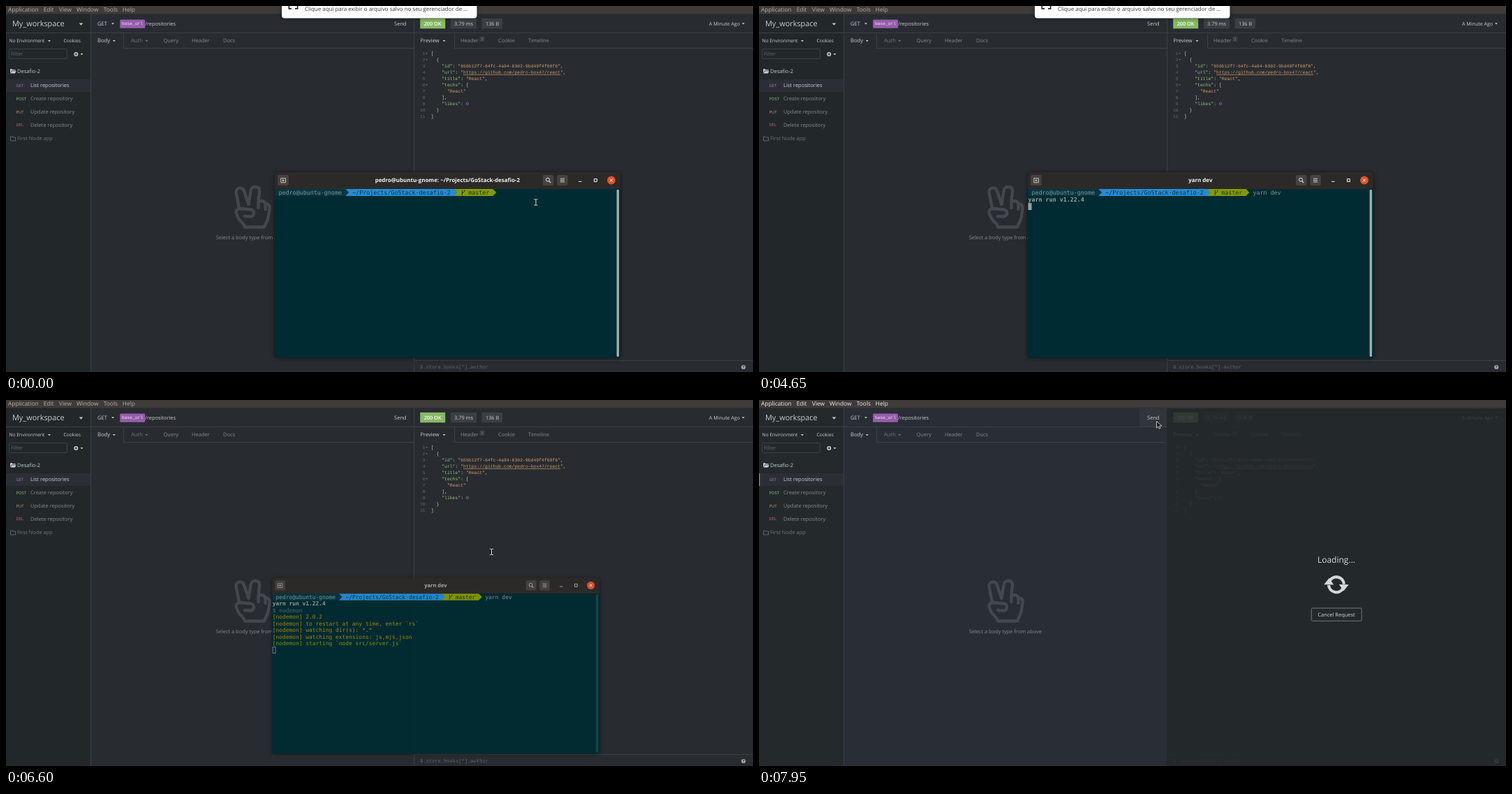
An HTML page for the animation above (8 s loop, 1070 by 524 pixels).

```html
<!DOCTYPE html>
<html lang="en">
<head>
<meta charset="utf-8">
<title>API client and terminal</title>
<style>
  html, body { margin: 0; width: 100%; height: 100%; overflow: hidden; background: #282c31; }
  svg { display: block; width: 1070px; height: 524px; }
  text { font-family: "Open Sans", "Noto Sans", sans-serif; white-space: pre; text-rendering: geometricPrecision; }
  .code { font-family: "Liberation Mono", monospace; }
  .term { font-family: "DejaVu Sans Mono", monospace; }
</style>
</head>
<body>
<svg id="stage" viewBox="0 0 1070 524" xmlns="http://www.w3.org/2000/svg"></svg>
<script>
const LOOP = 8000, STEP = 50;
const CELL = 5.03, ROW = 10.05, TERM_X = 385.5, TERM_Y = 262;
const C = {
  line: '#3b4046', text: '#c9ccd0', mid: '#9a9ea3', dim: '#70757a',
  green: '#98c379', orange: '#d19a66', red: '#d8606a', purple: '#b56fd0',
  base: '#839496', base1: '#93a1a1', dark: '#073642', blue: '#268bd2', olive: '#859900', yellow: '#a98a08'
};

const esc = s => s.replace(/&/g, '&amp;').replace(/</g, '&lt;');
const text = (x, y, size, fill, s, more = '') =>
  `<text x="${x}" y="${y}" font-size="${size}" fill="${fill}" ${more}>${esc(s)}</text>`;
const rect = (x, y, w, h, fill, more = '') =>
  `<rect x="${x}" y="${y}" width="${w}" height="${h}" fill="${fill}" ${more}/>`;
const path = (d, stroke, w = 1, more = '') =>
  `<path d="${d}" fill="none" stroke="${stroke}" stroke-width="${w}" ${more}/>`;
const shape = (d, fill) => `<path d="${d}" fill="${fill}"/>`;
const caret = (x, y, fill, r = 2) => shape(`M${x - r} ${y - r / 2}h${2 * r}l${-r} ${r * 1.1}z`, fill);
const group = (id, inner, more = '') => `<g id="${id}" ${more}>${inner}</g>`;

function sidebar() {
  const items = [['GET', 'List repositories', C.purple], ['POST', 'Create repository', C.green],
    ['PUT', 'Update repository', C.orange], ['DEL', 'Delete repository', C.red]];
  return rect(0, 11, 121, 513, '#22272a', 'id="side"') +
    text(9, 29, 10.9, C.text, 'My_workspace') + caret(107.5, 26, C.text, 2.8) +
    text(4.5, 52.3, 6.7, C.text, 'No Environment') + caret(62, 50, C.text) +
    text(82.5, 52.3, 6.7, C.text, 'Cookies') +
    rect(4.5, 61.5, 83, 14, 'none', `rx="1.5" stroke="${C.line}"`) + text(7, 71.3, 7.4, '#62676c', 'Filter') +
    `<circle cx="100.3" cy="69" r="3" fill="${C.text}"/>` + path('M98.5 69h3.6M100.3 67.2v3.6', '#22272a', .9) +
    caret(108.5, 69, C.text) +
    shape('M6 96.5V90.3h2.8l.9 1h4v1.2H8zM6.6 96.6l1.8-3.4h6.2l-1.7 3.4z', C.text) +
    text(16, 96.1, 7.5, C.text, 'Desafio-2') +
    rect(0, 105, 121, 18, '#2b2f35') + rect(0, 105, 1.2, 18, C.purple, 'id="mark"') +
    items.map(([verb, name, col], i) => {
      const y = 116.4 + i * 18.7;
      return text(14.6, y - .2, 5.8, col, verb) + text(35, y, 7.5, i ? '#85898e' : C.text, name);
    }).join('') +
    path('M6.5 187h2.5l1 1h3.5v5h-7z', C.dim, .8) + text(16, 192.3, 7.45, C.dim, 'First Node app');
}

function request() {
  const hand = 'M334 290L329.8 268C328 260 338.5 257 341 265L347.5 284L350.5 265C351 256.5 363.5 257 363 265L361.5 281' +
    'C365 277.5 371 279 371.5 284C374.5 282.5 378 285 377.7 289.5L376 301C374.5 309 371 312 370 316.5H342' +
    'C341 310 335 309 332.5 303L329.7 296.5C329 292 332 290 336 290L351 291.5C357 293.5 356 301.5 350 301.5L342 301' +
    'M361.5 281V289M371.5 284V291';
  return rect(545, 12, 39, 26, '#31353c', 'id="send"') +
    text(131, 27.7, 7.5, C.text, 'GET') + caret(153, 25.3, C.text) +
    rect(163.2, 19.6, 36, 12.2, '#975cab', 'rx="1.5"') + text(166, 27.4, 6.25, '#f0e8f2', 'base_url', 'class="code"') +
    text(199.2, 27.7, 7.4, C.text, '/repositories') + text(556, 27.7, 7.55, C.text, 'Send') +
    text(131, 52.4, 7.7, C.text, 'Body') + caret(154.8, 50, C.text) +
    text(179, 52.4, 7.6, C.dim, 'Auth') + caret(201.5, 50, C.dim) +
    [[225.5, 'Query'], [266, 'Header'], [311, 'Docs']].map(([x, s]) => text(x, 52.4, 7.5, '#85898e', s)).join('') +
    path(hand, '#43484e', 4.3, 'stroke-linejoin="round" stroke-linecap="round"') +
    text(300.7, 333.6, 7.43, '#85898e', 'Select a body type from above');
}

function response() {
  const key = s => [C.green, `"${s}"`], str = s => [C.orange, `"${s}"`], p = s => [C.text, s];
  const link = 'https://github.com/pedro-box47/react';
  const rows = [
    [0, p('[')], [2, p('{')],
    [4, key('id'), p(': '), str('656b12f7-64fc-4a94-8302-9bd49f4f68f6'), p(',')],
    [4, key('url'), p(': '), [C.orange, '"'], [C.orange, link, 1], [C.orange, '"'], p(',')],
    [4, key('title'), p(': '), str('React'), p(',')],
    [4, key('techs'), p(': [')], [6, str('React')], [4, p('],')],
    [4, key('likes'), p(': '), [C.purple, '0']], [2, p('}')], [0, p(']')]
  ];
  const json = rows.map(([indent, ...parts], i) => {
    const y = 70.3 + i * 8.92;
    const spans = parts.map(([f, s, u]) =>
      `<tspan fill="${f}"${u ? ' text-decoration="underline"' : ''}>${s}</tspan>`).join('');
    return text(600.5, y, 6.2, '#666b70', String(i + 1), 'class="code" text-anchor="end"') +
      ([0, 1, 5].includes(i) ? caret(602.6, y - 2.2, '#666b70', 1.6) : '') +
      `<text class="code" x="${608.7 + indent * 3.87}" y="${y}" font-size="6.45">${spans}</text>`;
  }).join('');
  const pill = (x, w, fill) => rect(x, 17.8, w, 14.5, fill);
  return pill(593.2, 36, '#86b965') + text(598.7, 27.6, 7.3, '#fff', '200 OK', 'font-weight="600"') +
    pill(637, 37, '#3a3f44') + text(642, 27.6, 7.4, C.text, '3.79 ms') +
    pill(681.5, 29.5, '#3a3f44') + text(687, 27.6, 7.3, C.text, '136 B') +
    text(1007, 27.6, 7.1, C.text, 'A Minute Ago') + caret(1056, 25.3, C.text) +
    text(593.5, 52.4, 7.5, C.text, 'Preview') + caret(627.5, 50, C.text) +
    [[651, 'Header'], [705, 'Cookie'], [748, 'Timeline']].map(([x, s]) => text(x, 52.4, 7.5, '#85898e', s)).join('') +
    rect(678.5, 43.5, 7, 7.5, '#3a3f44', 'rx="1"') + text(682, 49.5, 5.5, C.mid, '?', 'text-anchor="middle"') +
    json + path('M585 507.5H1070', C.line) +
    text(593, 519, 7.1, '#60656a', '$.store.books[*].author', 'class="code"') +
    `<circle cx="1056.3" cy="517" r="3.1" fill="#a3a7ab"/>` +
    text(1056.3, 519.1, 5.6, '#282c31', '?', 'text-anchor="middle" font-weight="700"');
}

function loading() {
  const half = 'M-10.8 1.4A10.9 10.9 0 0 1 8.4 -7';
  const arm = path(half, '#d5d8da', 4.2) + shape('M14.4 -10.4L13.8 1.4L3 -2.4z', '#d5d8da');
  return group('veil', rect(584, 12, 486, 512, '#23282b', 'fill-opacity=".88"') +
    text(827, 232.6, 12, '#d5d8da', 'Loading...', 'text-anchor="middle"') +
    group('spin', arm + `<g transform="rotate(180)">${arm}</g>`) +
    rect(791.2, 298, 72, 18.3, 'none', 'rx="1.5" stroke="#74797d"') +
    text(827, 309.8, 7.48, '#d5d8da', 'Cancel Request', 'text-anchor="middle"'));
}

const col = n => TERM_X + n * CELL;
const row = n => TERM_Y + n * ROW;
const line = (c, r, fill, s, more = '') => text(col(c), row(r) + 7.8, 8.36, fill, s, `class="term" ${more}`);
const arrowEnd = (c, fill) => shape(`M${col(c) - .3} 262h.3l${CELL} 5l${-CELL} 5h-.3z`, fill);

function terminal() {
  const log = ['2.0.2', 'to restart at any time, enter `rs`', 'watching dir(s): *.*',
    'watching extensions: js,mjs,json', 'starting `node src/server.js`'];
  const seg = (a, b, fill) => rect(col(a), 262, (b - a) * CELL, 10, fill);
  const button = x => rect(x, 242, 15.5, 15, '#454240', 'rx="2"');
  const icons = '<text id="title" x="632.3" y="252.3" font-size="7.95" font-weight="700" fill="#f3f2f0" text-anchor="middle"></text>' +
    path('M393.8 252.8V246.6h6.6v6.2zM397 248v3.4M395.3 249.7h3.4', '#d5d3d0', .9) +
    `<circle cx="776" cy="248.7" r="2.5" fill="none" stroke="#e5e3e0"/>` + path('M777.8 250.6l2.4 2.4', '#e5e3e0', 1.2) +
    path('M794 247.2h6M794 249.5h6M794 251.8h6', '#e5e3e0', .9) +
    path('M820 251.3h4.6', '#f0efed', 1) + path('M842.5 247.5h4v4h-4z', '#f0efed', 1);
  return group('win',
    rect(385, 239, 495, 265, '#000', 'rx="4" opacity=".6" filter="url(#soft)"') +
    shape('M385 262V243q0-5 5-5H875q5 0 5 5V262z', '#2c2a29') +
    rect(385, 262, 495, 242, '#002b32') +
    button(389.3) + button(769) + button(789.3) +
    `<circle id="hover" cx="822.3" cy="249.5" r="7" fill="#454240"/>` +
    group('icons', icons) +
    `<circle cx="867" cy="249.5" r="5.9" fill="#e0512b"/>` + path('M865 247.5l4 4M869 247.5l-4 4', '#fff', 1) +
    seg(0, 20, C.dark) + seg(20, 51, C.blue) + seg(51, 62, C.olive) +
    arrowEnd(20, C.dark) + arrowEnd(51, C.blue) + arrowEnd(62, C.olive) +
    line(1, 0, C.base, 'pedro@ubuntu-gnome') + line(22, 0, C.dark, '~/Projects/GoStack-desafio-2') +
    path('M653.4 263.5V271M656.8 263.5V265.3L653.4 268.6', C.dark, 1) + line(55, 0, C.dark, 'master') +
    line(64, 0, C.base, '', 'id="typed"') +
    group('out1', line(0, 1, C.base1, 'yarn run v1.22.4', 'font-weight="700"')) +
    group('out2', line(0, 2, '#506870', '$ nodemon')) +
    group('out3', log.map((s, i) => line(0, 3 + i, i < 4 ? C.yellow : C.olive, '[nodemon] ' + s)).join('')) +
    rect(0, 0, CELL, 10, C.base1, 'id="cursor"') +
    rect(874.7, 263, 3.4, 239, '#a5adab', 'id="bar" rx="1.2"'));
}

function notice() {
  return group('note', rect(395, -20, 279.5, 37.5, '#000', 'rx="4" opacity=".45" filter="url(#soft)"') +
    rect(395, -20, 279.5, 37.5, '#fdfdfd', 'rx="4"') +
    path('M405.3 0V3.8H409M414 3.8H417.6V0', '#26282a', 1.7) +
    text(428, 6.6, 7.93, '#3c3e40', 'Clique aqui para exibir o arquivo salvo no seu gerenciador de ...'));
}

function pointers() {
  const bar = 'M-2.6 -4.2H-.6L0 -3.6L.6 -4.2H2.6M0 -3.8V3.8M-2.6 4.2H-.6L0 3.6L.6 4.2H2.6';
  return group('arrow', '<path d="M.4 .4V10L2.7 8L4.2 11.2L5.9 10.4L4.5 7.3L7.8 7z" fill="#17191b" stroke="#e8e8e8" stroke-width=".8" stroke-linejoin="round"/>') +
    group('beam', path(bar, '#15181a', 2.2) + path(bar, '#dfe2e2', 1));
}

const menu = [[3, 'Application'], [53.7, 'Edit'], [76, 'View'], [101, 'Window'], [139.8, 'Tools'], [166.8, 'Help']];
document.getElementById('stage').innerHTML =
  '<defs><filter id="soft" x="-10%" y="-30%" width="120%" height="160%"><feGaussianBlur stdDeviation="3"/></filter></defs>' +
  rect(0, 0, 1070, 524, '#282c31', 'id="main"') + sidebar() + request() +
  path('M0 38.5H1070M121.5 11V524M168.5 39V60.5H584M642.5 39V60.5H1070M584.5 11V524', C.line) +
  response() + loading() +
  rect(0, 0, 1070, 11.3, '#3f3b39') +
  group('menu', menu.map(([x, s]) => text(x, 7.6, 8.35, 'currentColor', s)).join('')) +
  terminal() + notice() + pointers();

const el = id => document.getElementById(id);
const set = (id, attrs) => { for (const k in attrs) el(id).setAttribute(k, attrs[k]); };
const show = (id, on) => { el(id).style.display = on ? '' : 'none'; };

const typing = [[3150, 'y'], [3400, 'yar'], [3550, 'yarn'], [3650, 'yarn '], [4000, 'yarn d'], [4300, 'yarn dev']];
const newlines = [[4400, 1], [4650, 2], [4850, 3], [4950, 8]];
const mouse = [[5400, 759, 281], [5650, 808, 262], [5850, 858, 241], [6000, 841, 243], [6150, 824, 246],
  [6300, 824, 246], [6450, 785, 237], [6600, 695.5, 217.4], [6750, 470, 135], [6950, 232, 56],
  [7100, 232, 56], [7300, 569, 38], [7450, 569, 38], [7550, 569, 30]];
const MINIMIZE = 6367, MIN_TIME = 400, FOCUS = 7600;

const last = (table, t) => table.filter(r => r[0] <= t).pop();
const clamp = v => Math.max(0, Math.min(1, v));

function mouseAt(t) {
  const i = mouse.findIndex(m => m[0] > t);
  if (i === 0) return mouse[0].slice(1);
  if (i < 0) return mouse[mouse.length - 1].slice(1);
  const [a, x, y] = mouse[i - 1], [b, u, v] = mouse[i], k = (t - a) / (b - a);
  return [x + (u - x) * k, y + (v - y) * k];
}

function drawTerminal(t) {
  const k = (t - MINIMIZE) / MIN_TIME, active = k < 0;
  show('win', k < 1);
  if (k >= 1) return;
  const p = active ? 0 : 2 ** (10 * (k - 1));
  set('win', {
    transform: `translate(${385 - 69 * p} ${238 + 299 * p}) scale(${1 - .953 * p}) translate(-385 -238)`,
    opacity: 1 - p
  });
  const typed = last(typing, t), out = last(newlines, t);
  const word = typed ? typed[1] : '';
  el('typed').textContent = word;
  el('title').textContent = out ? 'yarn dev' : 'pedro@ubuntu-gnome: ~/Projects/GoStack-desafio-2';
  show('out1', t >= 4650);
  show('out2', t >= 4850);
  show('out3', t >= 4950);
  const event = out || typed;
  const lit = event ? Math.floor((t - event[0]) / 600) % 2 === 0 : Math.floor((t + 500) / 600) % 2 === 1;
  show('cursor', lit || !active);
  const inset = active ? 0 : .4;
  set('cursor', {
    x: col(out ? 0 : 64 + word.length) + inset, y: row(out ? out[1] : 0) + inset,
    width: CELL - 2 * inset, height: 10 - 2 * inset,
    fill: active ? C.base1 : 'none', stroke: active ? 'none' : C.base1, 'stroke-width': .8
  });
  set('bar', { fill: active ? '#a5adab' : '#1d4449' });
  set('icons', { opacity: active ? 1 : .65 });
}

function drawMouse(t) {
  const [x, y] = mouseAt(t), hidden = t >= 3150 && t < 5400;
  const open = t < MINIMIZE + MIN_TIME;
  const overTerm = open && x > 385 && x < 874 && y > 262;
  const overCode = x > 585 && y > 61 && !(t < MINIMIZE && y > 238);
  const beam = overTerm || overCode;
  show('beam', beam && !hidden);
  show('arrow', !beam && !hidden);
  set(beam ? 'beam' : 'arrow', { transform: `translate(${x} ${y})` });
  show('hover', t < MINIMIZE && Math.hypot(x - 822.3, y - 249.5) < 8);
  show('send', x > 545 && x < 584 && y < 38);
}

function draw(t) {
  drawTerminal(t);
  drawMouse(t);
  show('note', t < 5150);
  set('note', { transform: `translate(0 ${t < 5100 ? 0 : -9})` });
  const focus = t >= FOCUS;
  set('main', { fill: focus ? '#292d35' : '#282c31' });
  set('side', { fill: focus ? '#24292c' : '#22272a' });
  set('menu', { color: focus ? '#f0efed' : '#b3b0ac' });
  show('mark', focus);
  const fade = clamp((t - 7650) / 250);
  show('veil', fade > 0);
  set('veil', { opacity: fade });
  set('spin', { transform: `translate(827 264.3) rotate(${(t - 7950) * .18 + 36})` });
}

const start = performance.now();
function tick() {
  const t = (performance.now() - start) % LOOP;
  draw(Math.floor(t / STEP) * STEP);
  requestAnimationFrame(tick);
}
draw(0);
requestAnimationFrame(tick);
</script>
</body>
</html>
```
